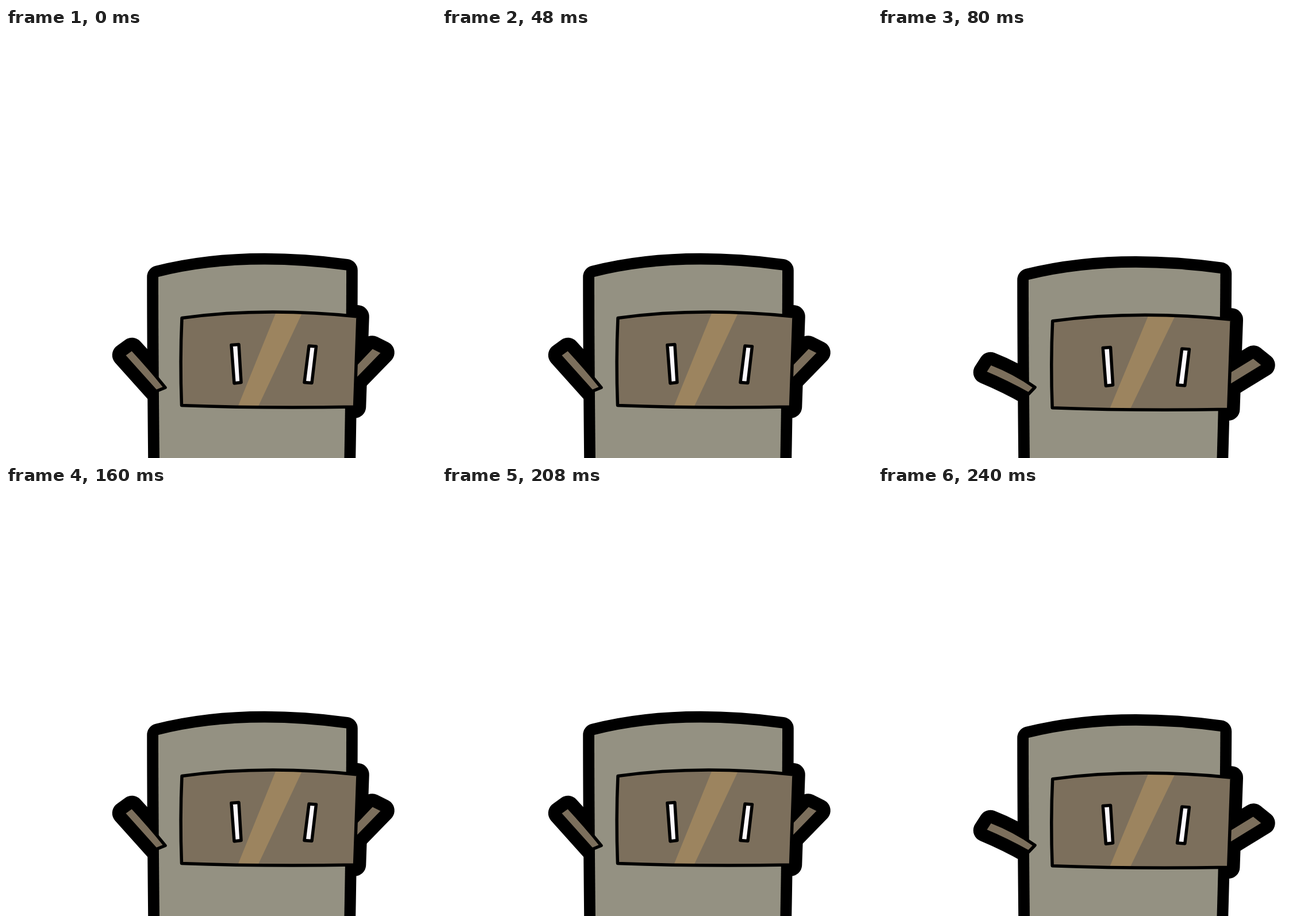
Animation, 748 px wide and 748 px high, one loop 320 ms. Source, as an HTML page with a canvas:

```html
<!DOCTYPE html>
<html lang="en">
<head>
<meta charset="utf-8">
<title>Waving helmet</title>
<style>
  html, body { margin: 0; height: 100%; overflow: hidden; background: #fff; }
  canvas { display: block; width: 748px; height: 748px; }
</style>
</head>
<body>
<canvas id="stage" width="748" height="748"></canvas>
<script>
const ctx = document.getElementById('stage').getContext('2d');
const HALO = 39.5, LINE = 5.5, POSE_MS = 80;
const GREY = '#949182', BROWN = '#7c6f5c', GLARE = '#9c845f', WHITE = '#fcf8fc';

const face = {
  visor: 'M306 504.500Q448 485 612 502L606.500 659Q450 662 305.500 656.500Q302.500 580 306 504.500Z',
  glare: 'M470 494L516 494L437 662L402 662Z',
  leftEye: 'M392 551.500L405 550.500L409 616.500L397 618Z',
  rightEye: 'M527 553L539.500 554L532 617.500L519 616.500Z'
};

// Raised arms with a tall head, then lowered arms with a squashed head.
const poses = [
  {
    faceMatrix: [1, 0, 0, 1, 0, 0],
    body: 'M265 433Q408 397 592 421.500Q592 570 587.500 800L267.500 800Q265 570 265 433Z',
    leftArm: 'M204.500 569L219 558.500Q250 592 277 625.500L261 632Z',
    rightArm: 'M637 555L656 564.500L600 622L600 594Z'
  },
  {
    faceMatrix: [1.0183, 0, 0, .994, -7.9, 8.2],
    body: 'M262 438Q408 402 595.500 427Q595 570 588 800L264.500 800Q262 570 262 438Z',
    leftArm: 'M185.500 599L195.500 583.500Q238 600 273 625L262 636.500Q226 616 185.500 599Z',
    rightArm: 'M653 572L671 586.500L600 630L600 604.500Z'
  }
].map(({ faceMatrix, ...parts }) => {
  const pose = {};
  for (const name in parts) pose[name] = new Path2D(parts[name]);
  for (const name in face) {
    pose[name] = new Path2D();
    pose[name].addPath(new Path2D(face[name]), new DOMMatrix(faceMatrix));
  }
  return pose;
});

function fill(path, color) {
  ctx.fillStyle = color;
  ctx.fill(path);
}

function outline(path, width) {
  ctx.lineWidth = width;
  ctx.stroke(path);
}

function inked(path, color) {
  fill(path, color);
  outline(path, LINE);
}

function draw(pose) {
  ctx.fillStyle = '#fff';
  ctx.fillRect(0, 0, 748, 748);
  ctx.strokeStyle = '#000';
  ctx.lineJoin = 'round';

  const { body, visor, glare, leftArm, rightArm, leftEye, rightEye } = pose;
  for (const part of [body, visor, leftArm, rightArm]) outline(part, HALO);
  fill(body, GREY);
  inked(leftArm, BROWN);
  inked(rightArm, BROWN);

  fill(visor, BROWN);
  ctx.save();
  ctx.clip(visor);
  fill(glare, GLARE);
  ctx.restore();
  outline(visor, LINE);

  inked(leftEye, WHITE);
  inked(rightEye, WHITE);
}

const start = performance.now();
function tick() {
  const step = Math.floor((performance.now() - start) / POSE_MS);
  draw(poses[step % poses.length]);
  requestAnimationFrame(tick);
}
tick();
</script>
</body>
</html>
```
